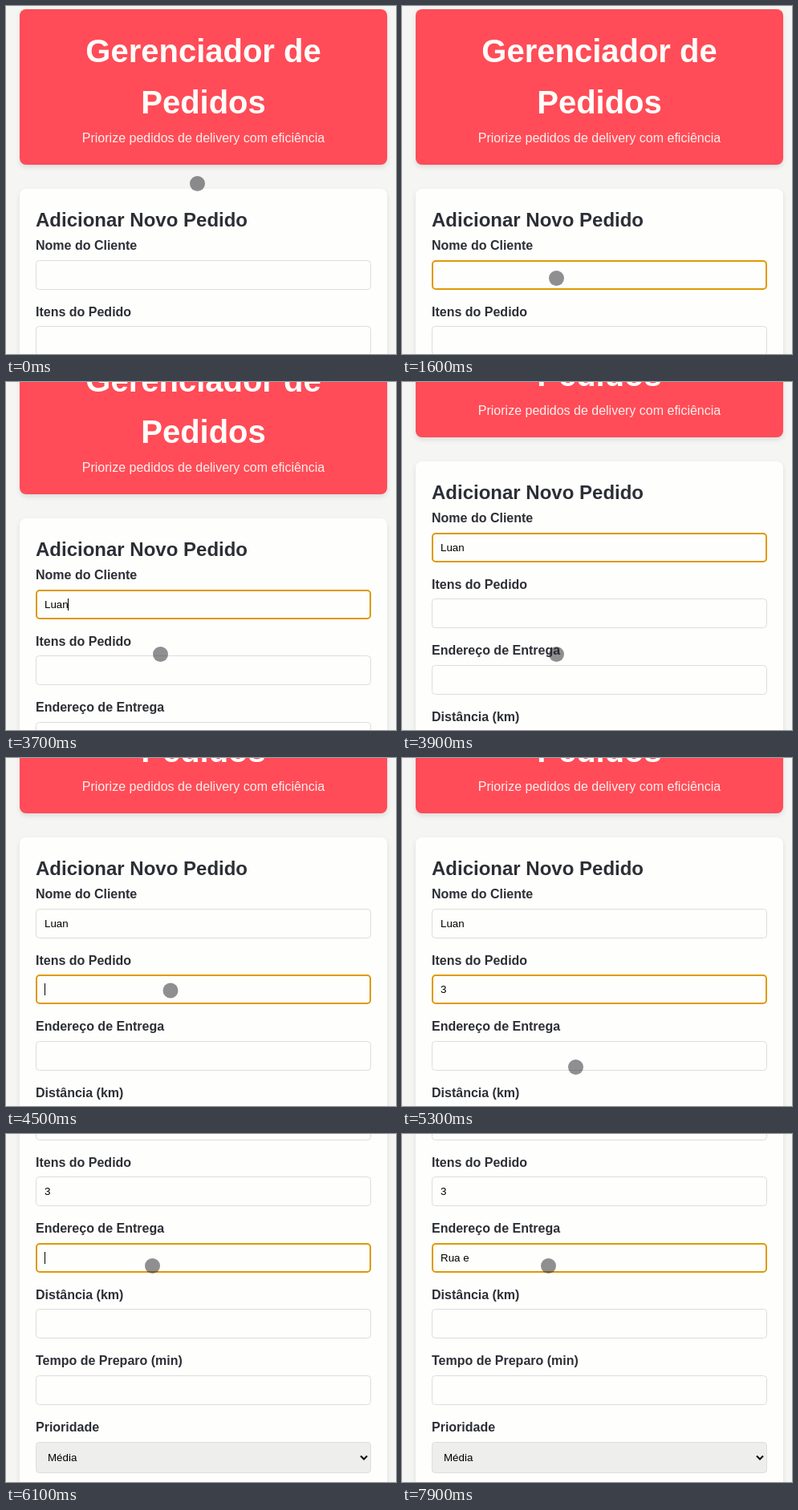
Write an HTML page with a canvas that moves like this. It is 486 px wide and 434 px high and loops after 8 s.

```html
<!DOCTYPE html>
<html lang="pt-BR">
<head>
<meta charset="utf-8">
<title>Gerenciador de Pedidos</title>
<style>
html, body { margin: 0; width: 100%; height: 100%; overflow: hidden; background: #f5f5f4; }
canvas { display: block; }
</style>
</head>
<body>
<canvas id="stage"></canvas>
<script>
const W = 486, H = 434, LOOP = 8000, STEP = 100;
const FONT = '"Liberation Sans", Arial, sans-serif';
const canvas = document.getElementById('stage');
const ctx = canvas.getContext('2d');
const ratio = window.devicePixelRatio || 1;
canvas.width = W * ratio;
canvas.height = H * ratio;
canvas.style.width = W + 'px';
canvas.style.height = H + 'px';

const C = {
  page: '#f5f5f4', card: '#fefefd', header: '#ff4c58', title: '#fefefa', sub: '#ffeeea',
  ink: '#2d2f36', border: '#dddddc', focus: '#de9a04', select: '#eeeeec', pointer: 'rgba(40,40,46,.52)'
};

const labels = ['Nome do Cliente', 'Itens do Pedido', 'Endereço de Entrega',
  'Distância (km)', 'Tempo de Preparo (min)', 'Prioridade'];

// One entry per focused field: focus time, typed text, key times
const entries = [
  { at: 700, text: 'Luan', keys: [2300, 2700, 3100, 3300] },
  { at: 4500, text: '3', keys: [4800] },
  { at: 6000, text: 'Rua e', keys: [6500, 6700, 6900, 7100, 7400] }
];

// Keyframes: time, then values
const scrollPath = [[3500, 0], [3600, 16], [3700, 58], [3800, 104], [3900, 129],
  [5300, 129], [5400, 150], [5500, 215], [5600, 295], [5700, 346]];
const pointerPath = [[0, 238.5, 221.5], [300, 192.5, 339.5], [4100, 192.5, 339.5],
  [4400, 205, 290], [5000, 205, 290], [5300, 216.5, 385.5], [5500, 216.5, 385.5], [5900, 182.5, 164.5]];

function along(path, t) {
  const i = path.findIndex(p => p[0] > t);
  if (i === 0) return path[0].slice(1);
  if (i < 0) return path[path.length - 1].slice(1);
  const a = path[i - 1], b = path[i];
  const k = (t - a[0]) / (b[0] - a[0]);
  return a.slice(1).map((v, j) => v + (b[j + 1] - v) * k);
}

function box(x, y, w, h, r, fill, stroke, line = 1) {
  const d = stroke ? line / 2 : 0;
  ctx.beginPath();
  ctx.roundRect(x + d, y + d, w - 2 * d, h - 2 * d, r);
  ctx.fillStyle = fill;
  ctx.fill();
  if (stroke) {
    ctx.strokeStyle = stroke;
    ctx.lineWidth = line;
    ctx.stroke();
  }
}

function panel(y, h, fill) {
  ctx.save();
  ctx.shadowColor = 'rgba(0,0,0,.1)';
  ctx.shadowBlur = 6 * ratio;
  ctx.shadowOffsetY = 3 * ratio;
  box(17, y, 458, h, 8, fill);
  ctx.restore();
}

function write(s, x, y, size, color, bold, align = 'left') {
  ctx.font = (bold ? 'bold ' : '') + size + 'px ' + FONT;
  ctx.textAlign = align;
  ctx.fillStyle = color;
  ctx.fillText(s, x, y);
}

function drawHeader() {
  panel(4, 194, C.header);
  write('Gerenciador de', 246, 70, 40, C.title, true, 'center');
  write('Pedidos', 246, 134, 40, C.title, true, 'center');
  write('Priorize pedidos de delivery com eficiência', 246, 170, 16, C.sub, false, 'center');
}

function drawSelect(y) {
  box(37, y, 418, 39, 4, C.select, C.border);
  write('Média', 52, y + 24, 13.333, '#000');
  ctx.beginPath();
  ctx.moveTo(442, y + 17.5);
  ctx.lineTo(446, y + 21.5);
  ctx.lineTo(450, y + 17.5);
  ctx.strokeStyle = '#000';
  ctx.lineWidth = 2;
  ctx.stroke();
}

function drawInput(y, entry, focused, t) {
  box(37, y, 418, 37, 4, C.card, focused ? C.focus : C.border, focused ? 2 : 1);
  if (!entry) return;
  const pressed = entry.keys.filter(k => k <= t);
  const typed = entry.text.slice(0, pressed.length);
  write(typed, 48, y + 23, 13.333, '#000');
  const last = pressed.length ? pressed[pressed.length - 1] : entry.at;
  if (focused && (t - last) % 1000 < 500) {
    ctx.fillRect(Math.floor(48 + ctx.measureText(typed).width), y + 11, 1, 15);
  }
}

function drawForm(t) {
  panel(228, 700, C.card);
  write('Adicionar Novo Pedido', 37, 275, 24, C.ink, true);
  const active = entries.filter(e => e.at <= t).length - 1;
  labels.forEach((label, i) => {
    const shift = 82.55 * i;
    const top = Math.floor(317.3 + shift);
    write(label, 37, Math.round(304.2 + shift), 16, C.ink, true);
    if (i === 5) drawSelect(top);
    else drawInput(top, entries[i], i === active, t);
  });
}

function draw(t) {
  ctx.setTransform(ratio, 0, 0, ratio, 0, 0);
  ctx.fillStyle = C.page;
  ctx.fillRect(0, 0, W, H);
  ctx.save();
  ctx.translate(0, -Math.round(along(scrollPath, t)[0]));
  drawHeader();
  drawForm(t);
  ctx.restore();
  const [x, y] = along(pointerPath, t);
  ctx.beginPath();
  ctx.arc(x, y, 9.5, 0, Math.PI * 2);
  ctx.fillStyle = C.pointer;
  ctx.fill();
}

const start = performance.now();
function tick() {
  const t = (performance.now() - start) % LOOP;
  draw(Math.floor(t / STEP) * STEP);
  requestAnimationFrame(tick);
}
tick();
</script>
</body>
</html>
```
